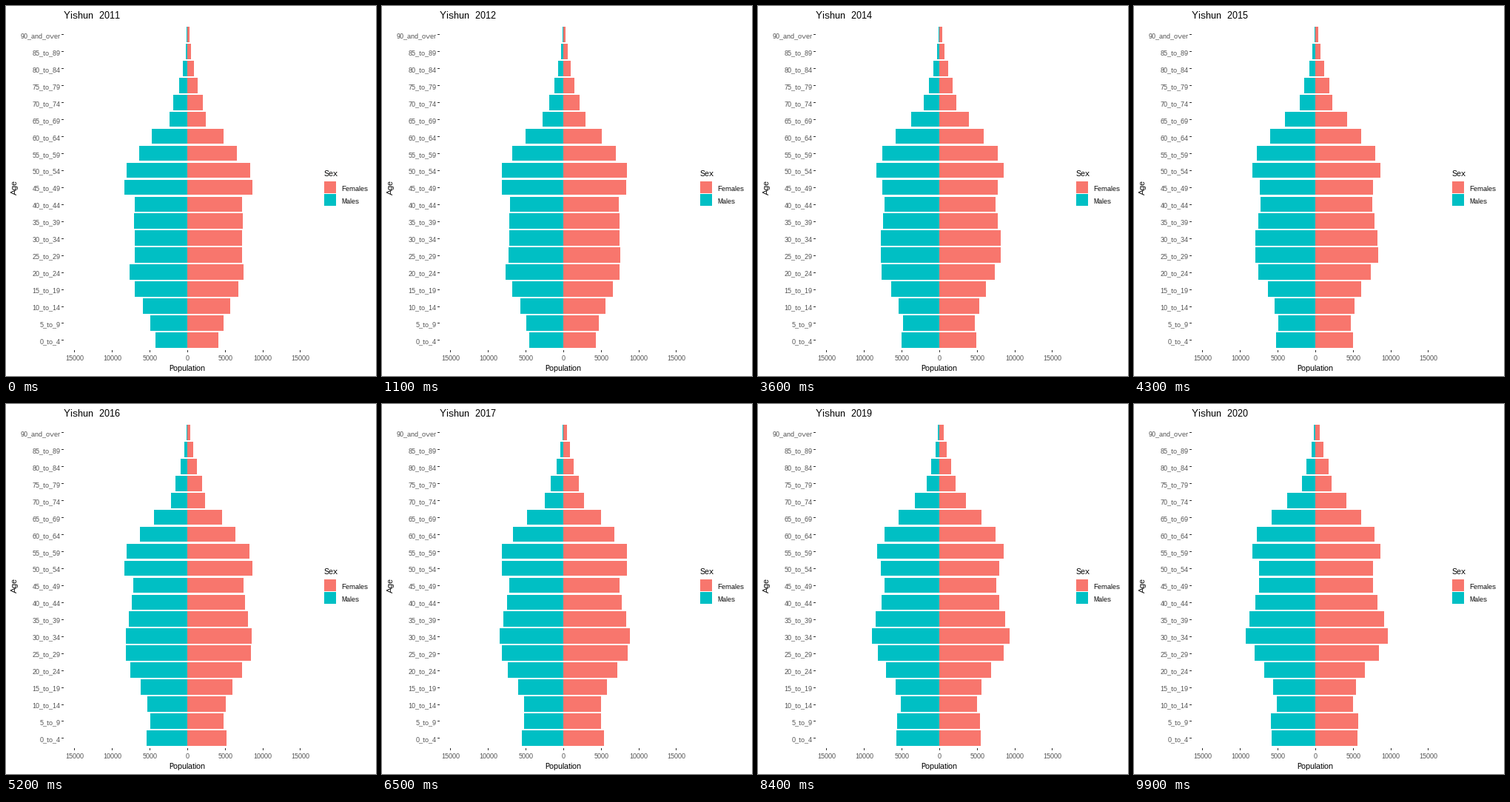
A matplotlib script that plays this animation: 500 px wide and 500 px high, repeating every 10 s.

```python
import numpy as np
import matplotlib.pyplot as plt
from matplotlib.animation import FuncAnimation
from matplotlib.patches import Rectangle

FRAMES, INTERVAL = 100, 100
FIRST_YEAR, STEPS_PER_YEAR = 2011, 11
GROUPS, GROUP_YEARS = 19, 5
ZERO, TOP, PITCH, HALF = 245, 38.89, 22.945, 10.33
CORAL, TEAL = "#F8766D", "#00BFC4"

# Crisp whole-pixel glyphs, no pair kerning
plt.rcParams.update({
    "font.family": "Liberation Sans",
    "text.hinting": "native",
    "text.hinting_factor": 1,
    "text.kerning_factor": 6,
})

# Women per five-year cohort in the first year, youngest first;
# the first two cohorts are not born yet.
COHORTS = [58, 54, 42, 49, 58, 69, 76, 74, 74, 75, 74,
           88, 85, 67, 49, 25, 21, 14, 9, 5, 3]
groups = np.arange(GROUPS)


def net_gain(age):
    """Cumulative arrivals minus deaths up to an age group."""
    children = 10 * (1 - np.exp(-1.1 * np.maximum(age, 0)))
    adults = 45 / (1 + np.exp((5.3 - age) / 0.8))
    deaths = np.maximum(age - 11, 0)
    return children + adults - deaths


def women(t):
    """Cohorts grow older with time and gain or lose people on the way."""
    origin = groups - t / GROUP_YEARS
    start = np.interp(origin, np.arange(-2, GROUPS), COHORTS)
    return start + net_gain(groups) - net_gain(origin)


# Men per woman: more boys, fewer adults, far fewer in old age
sex_ratio = (np.where(groups < 5, 1.03, 0.94 + 0.003 * groups)
             - 0.02 * np.maximum(groups - 12, 0) ** 2)

fig = plt.figure(figsize=(5, 5), dpi=100, facecolor="white")
ax = fig.add_axes([0, 0, 1, 1])
ax.set(xlim=(0, 500), ylim=(500, 0))
ax.axis("off")


def label(x, y, text, size=9, color="black", ha="left", **kw):
    return ax.text(x, y, text, fontsize=size * 0.72, color=color, ha=ha,
                   va="baseline", **kw)


def box(x, y, w, h, color):
    return ax.add_patch(Rectangle((x, y), w, h, facecolor=color, linewidth=0,
                                  antialiased=False))


title = label(78, 17, "", 13)
label(245, 493, "Population", 11, ha="center")
label(15, 245, "Age", 11, ha="center", rotation=90, rotation_mode="anchor")

for value in range(-15000, 15001, 5000):
    x = 245.4 + value * 0.010167
    box(int(x), 465, 1, 3, "#333333")
    label(x, 479, str(abs(value)), color="#4D4D4D", ha="center")

bars = []
for g in groups:
    first = g * GROUP_YEARS
    name = f"{first}_to_{first + 4}" if g < GROUPS - 1 else f"{first}_and_over"
    y = TOP + (GROUPS - 1 - g) * PITCH
    top, bottom = int(y - HALF), int(y + HALF)
    box(75, int(y), 3, 1, "#333333")
    label(73.5, round(y) + 4, name, color="#4D4D4D", ha="right")
    bars.append((box(ZERO, top, 0, bottom - top, TEAL),
                 box(ZERO, top, 0, bottom - top, CORAL)))

label(430, 230, "Sex", 11)
for y, name, color in ((237, "Females", CORAL), (254, "Males", TEAL)):
    box(430, y, 16, 16, color)
    label(453, y + 13, name)


def update(n):
    t = n / STEPS_PER_YEAR
    title.set_text(f"Yishun  {FIRST_YEAR + round(t)}")
    females = women(t)
    males = females * sex_ratio
    for (left, right), m, f in zip(bars, males, females):
        left.set_x(ZERO - round(m))
        left.set_width(round(m))
        right.set_width(round(f))
    return [title]


anim = FuncAnimation(fig, update, frames=FRAMES, interval=INTERVAL,
                     repeat=True, repeat_delay=0, blit=False)
plt.show()
```
